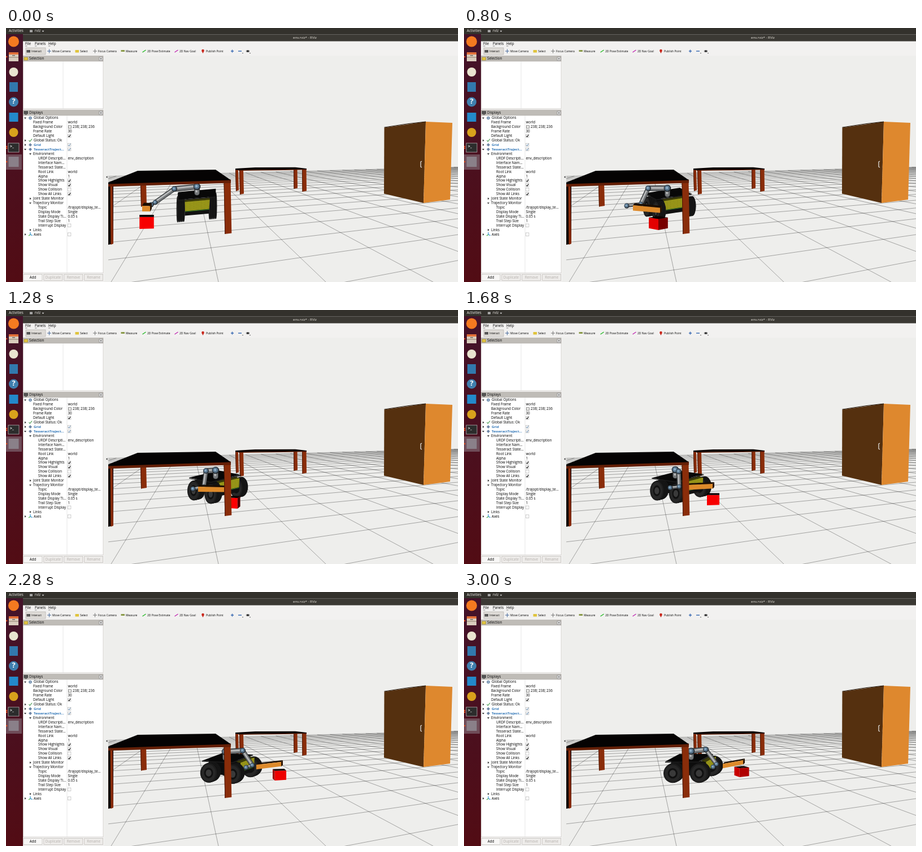
These frames come from a looping animation (800 by 450 pixels, 3.08 s). An HTML page with a canvas:

```html
<!DOCTYPE html>
<html lang="en">
<head>
<meta charset="utf-8">
<title>Robot trajectory</title>
<style>
html, body { margin: 0; width: 100%; height: 100%; overflow: hidden; background: #f2f1f0; }
canvas { display: block; }
</style>
</head>
<body>
<canvas id="stage" width="800" height="450"></canvas>
<script>
const g = document.getElementById('stage').getContext('2d');
const LOOP = 3080;

// ---------- drawing helpers ----------
function rect(x, y, w, h, fill, border) {
  if (fill) { g.fillStyle = fill; g.fillRect(x, y, w, h); }
  if (border) { g.strokeStyle = border; g.lineWidth = 0.6; g.strokeRect(x, y, w, h); }
}
function poly(points, fill) {
  g.beginPath();
  points.forEach(p => g.lineTo(p[0], p[1]));
  g.closePath();
  g.fillStyle = fill;
  g.fill();
}
function line(points, color, width = 1) {
  g.beginPath();
  points.forEach(p => g.lineTo(p[0], p[1]));
  g.strokeStyle = color;
  g.lineWidth = width;
  g.stroke();
}
function oval(x, y, rx, ry, fill) {
  g.beginPath();
  g.ellipse(x, y, rx, ry, 0, 0, 7);
  g.fillStyle = fill;
  g.fill();
}
const dot = (x, y, r, fill) => oval(x, y, r, r, fill);
function text(s, x, y, color = '#000', size = 6.25, style = '500', align = 'left') {
  g.font = `${style} ${size}px "Open Sans", "Noto Sans", sans-serif`;
  g.textAlign = align;
  g.textBaseline = 'middle';
  g.fillStyle = color;
  g.fillText(s, x, y + 0.3);
}

// ---------- window and panels ----------
function drawDock() {
  const shade = g.createLinearGradient(0, 0, 0, 450);
  shade.addColorStop(0, '#43142b');
  shade.addColorStop(1, '#520c14');
  rect(0, 11, 30, 439, shade);
  rect(0, 224, 28, 27, '#6f4c58');
  dot(13.5, 24, 9.5, '#f47a20');
  rect(5, 43, 17, 16, '#d9cdbd');
  rect(5, 43, 17, 4, '#e2713a');
  line([[5, 52], [22, 52]], '#8b7c6c');
  rect(11, 48, 5, 1.5, '#776a5c');
  dot(13.5, 78, 8, '#e9e4cf');
  rect(6, 96, 15, 17, '#3279ad');
  dot(13.5, 131, 8.5, '#3f7fae');
  text('?', 13.5, 130.5, '#fff', 13, 'bold', 'center');
  rect(5.5, 150, 16, 16, '#2389ca');
  dot(13.5, 185, 8, '#d8a21c');
  rect(4, 204, 19, 16, '#2c2c2c', '#ddd');
  text('>_', 7, 210, '#fff', 7, 'bold');
  rect(4.5, 228, 18, 18, '#8a8089');
  [51, 210, 213, 237].forEach(y => dot(1.2, y, 1.2, '#e95420'));
}

function drawToolbar() {
  rect(35, 35, 35, 12, '#dedbd7', '#a9a5a0');
  const tools = [
    [45, 'Interact', '#555'], [82, 'Move Camera', '#46699c'], [131, 'Select', '#e0c33a'],
    [163, 'Focus Camera', '#777'], [212, 'Measure', '#8a9a4a'], [250, '2D Pose Estimate', '#1fb81f'],
    [307, '2D Nav Goal', '#c022b0'], [354, 'Publish Point', '#c8261b']
  ];
  tools.forEach(([x, label, color], i) => {
    const c = x - 5.5;
    if (i === 5 || i === 6) line([[c - 3, 43], [c + 3, 39]], color, 1.4);
    else if (i === 7) { dot(c, 40, 2.3, color); poly([[c - 2, 41], [c + 2, 41], [c, 45]], color); }
    else if (i === 1 || i === 3) {
      line([[c - 3.5, 41], [c + 3.5, 41]], color);
      line([[c, 37.5], [c, 44.5]], color);
    } else rect(c - 3, 39, 6.5, i === 4 ? 3 : 4.5, color);
    text(label, x, 41, '#000', 5);
  });
  line([[398, 41], [403, 41]], '#4a76b8', 1.6);
  line([[400.5, 38.5], [400.5, 43.5]], '#4a76b8', 1.6);
  line([[411, 41], [417, 41]], '#4a76b8', 1.6);
  oval(428, 41, 3.2, 2, '#777');
  dot(428, 41, 1.2, '#111');
  [419, 432].forEach(x => poly([[x - 1, 44], [x + 1, 44], [x, 45.5]], '#333'));
}

function drawPanelHeader(y, label) {
  rect(30.5, y, 141.5, 9.5, '#bfbcb7', '#aaa6a1');
  if (label === 'Selection') rect(32, y + 2.5, 6.5, 5, '#e2c440', '#9a852a');
  else { rect(32, y + 2, 6.5, 4.5, '#555', '#222'); rect(33.5, y + 7.3, 3.5, 0.8, '#222'); }
  text(label, 41, y + 4.8);
  rect(165, y + 2, 6, 6, '#eee', '#777');
  line([[166.7, y + 3.7], [169.3, y + 6.3]], '#222', 0.8);
  line([[169.3, y + 3.7], [166.7, y + 6.3]], '#222', 0.8);
}

function arrow(x, y, open) {
  poly(open ? [[x - 2, y - 1], [x + 2, y - 1], [x, y + 1.7]]
            : [[x - 1, y - 2], [x - 1, y + 2], [x + 1.7, y]], '#333');
}
function checkbox(y, mark, x = 109.5) {
  rect(x, y - 2.8, 5.4, 5.4, '#fff', '#aaa');
  if (mark) line([[x + 1, y], [x + 2.3, y + 1.6], [x + 4.6, y - 1.9]], mark, 1.1);
}

// Rows: text column, label, value (true / false is a checkbox), arrow: 'v' open, '>' closed
const ROWS = [
  [49, 'Global Options', , 'v'], [48, 'Fixed Frame', 'world'],
  [48, 'Background Color', '238; 238; 236'], [48, 'Frame Rate', '30'], [48, 'Default Light', true],
  [49, 'Global Status: Ok', , '>'], [49, 'Grid', true, '>'], [49, 'TesseractTraject...', true, 'v'],
  [48, 'Environment', , 'v'], [57, 'URDF Descripti...', 'env_description'],
  [57, 'Interface Nam...'], [57, 'Tesseract State...'], [57, 'Root Link', 'world'], [57, 'Alpha', '1'],
  [57, 'Show Highlights', true], [57, 'Show Visual', true], [57, 'Show Collision', false],
  [57, 'Show All Links', true], [48, 'Joint State Monitor', , '>'], [48, 'Trajectory Monitor', , 'v'],
  [57, 'Topic', '/trajopt/display_te...'], [57, 'Display Mode', 'Single'],
  [57, 'State Display Ti...', '0.05 s'], [57, 'Trail Step Size', '1'], [57, 'Interrupt Display', false],
  [48, 'Links', , '>'], [49, 'Axes', false, '>']
];
function drawTree() {
  ROWS.forEach(([x, label, value, mark], i) => {
    const y = 159.5 + i * 7.93, blue = i === 6 || i === 7;
    if (mark) arrow(x === 49 ? 34 : 43, y, mark === 'v');
    text(label, x, y, blue ? '#2a72b5' : '#000', blue ? 6 : 6.25, blue ? 'bold' : '500');
    if (typeof value === 'boolean') checkbox(y, value && (blue ? '#7d9dbd' : '#111'));
    else if (i === 2) { rect(110.5, y - 2.5, 5, 5, '#eeeeec', '#444'); text(value, 118, y); }
    else if (value) text(value, 109.5, y);
    if (blue) poly([[40, y], [43, y - 3], [46, y], [43, y + 3]], '#6f86a5');
  });
  dot(43, 159.5, 2.8, '#6d8dac');
  dot(43, 159.5, 1, '#dde');
  line([[40.5, 199], [42.3, 201], [46, 196.5]], '#2f8f3a', 1.1);
  line([[43, 362], [43, 366], [47, 367.5]], '#2f8fd0', 1.2);
  line([[43, 366], [40, 368]], '#3fae3f', 1.2);
}

function drawWindow() {
  rect(0, 0, 800, 450, '#f2f1f0');
  rect(0, 0, 800, 11.5, '#33312c');
  rect(30, 11.5, 770, 12, '#3b3934');
  text('Activities', 5, 5.5, '#f0eeea');
  rect(42, 3.5, 5, 4, '#aaa');
  text('rviz', 51, 5.5, '#f0eeea');
  poly([[63.5, 4.7], [67.5, 4.7], [65.5, 7]], '#ddd');
  text('env.rviz* - RViz', 529, 17, '#eeeae2', 6.1, '500', 'center');
  drawDock();
  [['File', 34], ['Panels', 51], ['Help', 75]].forEach(([s, x]) => {
    text(s, x, 28.5);
    line([[x, 32], [x + 3.5, 32]], '#222', 0.5);
  });
  drawToolbar();
  drawPanelHeader(49.5, 'Selection');
  rect(30.5, 59, 141.5, 84, '#fff', '#bbb7b2');
  line([[101, 59], [101, 143]], '#ddd', 0.7);
  drawPanelHeader(145.5, 'Displays');
  rect(30.5, 155, 141.5, 279, '#fff', '#bbb7b2');
  line([[108, 155], [108, 434]], '#ddd', 0.7);
  drawTree();
  ['Add', 'Duplicate', 'Remove', 'Rename'].forEach((s, i) => {
    rect(31 + i * 35.9, 436.5, 33, 11, i ? '#eeecea' : '#f7f6f5', '#b8b4af');
    text(s, 47.5 + i * 35.9, 442, i ? '#b3afab' : '#000', 6.2, '500', 'center');
  });
  rect(174, 49, 7, 401, '#eeeeec');
  poly([[179.5, 262], [179.5, 266], [177, 264]], '#333');
}

// ---------- scene ----------
const HORIZON = 220, VP_NEAR = 326, VP_RIGHT = 1800;
const slope = depth => depth / (VP_RIGHT - 181);

function drawGrid() {
  const rows = 18, color = 'rgba(0,0,0,.5)';
  const depth = n => 1 / (0.00524 + 0.00101 * n);
  for (let n = -3; n <= rows; n++) {
    const d = depth(n);
    line([[181, HORIZON + d], [800, HORIZON + slope(d) * (VP_RIGHT - 800)]], color, 0.65);
  }
  const far = slope(depth(rows)), drop = 450 - HORIZON;
  for (let m = -9; m < 28; m++) {
    const dx = 186 + 190 * m - VP_NEAR;
    const s = far * (VP_RIGHT - VP_NEAR) / (drop + far * dx);
    line([[VP_NEAR + dx * s, HORIZON + drop * s], [VP_NEAR + dx, 450]], color, 0.65);
  }
}

function leg(x, top, w, bottom, tilt = 1) {
  poly([[x, top], [x + w, top], [x + w + tilt, bottom - 1.5], [x + tilt, bottom]], '#8a2d0a');
  line([[x + 0.5, top], [x + 0.5 + tilt, bottom]], '#4a1704', 1);
}

function drawBackground() {
  rect(181, 49, 619, 401, '#eeeeec');
  drawGrid();
  poly([[669.5, 176.5], [743, 166], [739, 310], [669, 293.5]], '#55300f');
  poly([[743, 166], [790, 168], [786, 304], [739, 310]], '#de882e');
  line([[669.5, 176], [711, 169.7], [743, 166]], '#1d0f04', 1);
  line([[736, 236], [734, 237], [734, 246], [736, 247]], '#eee', 1.2);
  leg(406, 250, 5, 289, 1);
  leg(509, 250, 6.5, 285, 0.5);
  leg(413, 251, 7, 295, 1);
  leg(524, 250, 7.5, 290, 0.5);
  poly([[406, 249], [441, 247], [512, 246.7], [532, 249], [532, 250.5], [412, 252], [406, 251]], '#080201');
  line([[412, 252.3], [532, 250.8]], '#5e1f07', 1.3);
  leg(238, 274, 10, 316.5, 1);
}

function drawNearTable() {
  poly([[181, 274], [190, 274], [190, 382], [181, 384]], '#0d0301');
  poly([[184.5, 274], [188.5, 274], [190, 382], [185.5, 384]], '#8a2d0a');
  leg(385.5, 271, 12, 365, 1.8);
  poly([[181, 275], [398, 268.5], [398, 274.5], [181, 281]], '#641f06');
  poly([[181, 273.5], [233, 253], [371, 251], [398, 269.5], [181, 276.5]], '#050303');
}

// ---------- motion ----------
// Poses hold for 80, 40 and 80 ms in turn.
function poseAt(ms) {
  const r = ms % 200;
  return Math.floor(ms / 200) * 3 + (r >= 120 ? 2 : r >= 80 ? 1 : 0);
}

const STEPS = [0, 5, 12, 19, 25, 34, 45];
const ROBOT = { // ground centre and heading in degrees
  x: [338, 348, 364, 375, 384, 399, 406], y: [318, 317, 316, 316.5, 316, 314.5, 314],
  turn: [90, 80, 72, 55, 50, 35, 24]
};
const CUBE = { // near bottom corner height and turn in degrees
  x: [249, 287, 344, 401, 441, 484, 491.5], y: [356, 359, 358, 352, 346, 334, 328],
  turn: [0, 14, 45, 78, 90, 100, 119]
};
const ARM = { // shoulder, elbow, wrist, tool
  sx: [338, 349, 360, 371, 374, 388, 402], sy: [281, 281, 284, 284, 283, 283, 282],
  ex: [298, 311, 326, 354, 380, 419, 428], ey: [285, 283, 284, 285, 286, 281, 279],
  wx: [264, 282, 313, 350, 381, 436, 447], wy: [309, 306, 312, 313, 313, 307, 305],
  tx: [257, 263, 288, 331, 365, 425, 441], ty: [313, 311, 315, 317, 315, 311, 310]
};
const BAR = { // upper edge of the front
  x1: [241, 261, 299, 340, 396, 443, 458], y1: [315, 314.5, 314, 313, 310, 306, 304.5],
  x2: [255, 292, 347, 386, 440, 487, 494], y2: [315.5, 319.5, 318.5, 314, 308, 301, 298]
};

// Monotone cubic through the key values
function ease(values, k) {
  const last = STEPS.length - 1;
  const rate = i => (values[i + 1] - values[i]) / (STEPS[i + 1] - STEPS[i]);
  const tangent = i => {
    if (i === 0) return rate(0);
    if (i === last) return 0;
    const a = rate(i - 1), b = rate(i);
    return a * b > 0 ? 2 * a * b / (a + b) : 0;
  };
  let i = 0;
  while (i < last - 1 && k >= STEPS[i + 1]) i++;
  const span = STEPS[i + 1] - STEPS[i], t = (k - STEPS[i]) / span, u = 1 - t;
  return values[i] * u * u * (1 + 2 * t) + values[i + 1] * t * t * (3 - 2 * t)
    + span * t * u * (tangent(i) * u - tangent(i + 1) * t);
}
const pose = (track, k) =>
  Object.fromEntries(Object.entries(track).map(([name, v]) => [name, ease(v, k)]));

// ---------- moving parts ----------
function drawRobot(k) {
  const { x, y, turn } = pose(ROBOT, k);
  const unit = 18 - k / 45, a = turn * Math.PI / 180, c = Math.cos(a), s = Math.sin(a);
  const at = (f, side, z) => {
    const dx = unit * (f * c - side * s);
    return [x + dx, y - unit * z + 0.2 * unit * (f * s + side * c) - 0.09 * dx];
  };
  const wheel = (f, side) => {
    const rx = unit * (0.95 * c + 0.05);
    for (let i = -4; i <= 4; i++) {
      const [px, py] = at(f, side + i * 0.08, 0);
      oval(px, py, rx + 0.8, unit, i % 2 ? '#0e0e0e' : '#1d1d1d');
    }
    const [px, py] = at(f, side + 0.34, 0);
    oval(px, py, rx * 0.86, unit * 0.86, '#272727');
    oval(px, py, rx * 0.55, unit * 0.55, '#101010');
    oval(px, py, rx * 0.36, unit * 0.36, '#3a3a3a');
  };
  wheel(-1.5, -1.55);
  wheel(1.5, -1.55);
  poly([at(-2, 1.2, 1.1), at(2, 1.2, 1.1), at(2, 1.2, -0.3), at(-2, 1.2, -0.3)], '#0d0d0d');
  poly([at(2, 1.2, 1.1), at(2, -1.2, 1.1), at(2, -1.2, -0.3), at(2, 1.2, -0.3)], '#111');
  poly([at(1.4, 1.25, 1.15), at(1.4, -1.25, 1.15), at(2, -1.25, 1), at(2, 1.25, 1)], '#3c3c0a');
  poly([at(2, 1.25, 1.05), at(2, -1.25, 1.05), at(2, -1.2, 0.15), at(2, 1.2, 0.15)], '#aaa71c');
  g.setLineDash([1.2, 1.4]);
  for (let z = 0.25; z < 1.05; z += 0.13) line([at(2, 1.2, z), at(2, -1.2, z)], '#3b3a08', 0.9);
  g.setLineDash([]);
  line([at(2, 1.2, 0.1), at(2, -1.2, 0.1)], '#3f9a2c', 0.8);
  wheel(-1.5, 1.6);
  wheel(1.5, 1.6);
  poly([at(-2.4, -1.85, 1.2), at(1.4, -1.85, 1.2), at(1.4, 1.85, 1.2), at(-2.4, 1.85, 1.2)], '#080808');
  line([at(1.4, -1.85, 1.15), at(1.4, 1.85, 1.15), at(-2.4, 1.85, 1.15)], '#1b1b1b', 1.5);
}

function drawCube(k) {
  const { x, y, turn } = pose(CUBE, k);
  const size = 25.5 - 0.14 * k, a = turn % 90 * Math.PI / 180;
  const p = size * Math.sin(a), q = size * Math.cos(a), h = size * 0.83;
  const mx = x + (p - q) / 2, top = y - h;
  const left = [mx - p, top - q * 0.15], right = [mx + q, top - p * 0.15];
  const down = ([px, py]) => [px, py + h * 0.96];
  const red = v => `rgb(${Math.round(255 * v)},0,0)`;
  const near = [mx, top], foot = [mx, y];
  poly([left, near, foot, down(left)], red(0.3 + 0.7 * Math.sqrt(p / size)));
  poly([near, right, down(right), foot], red(0.3 + 0.67 * (q / size) ** 4));
  poly([left, near, right, [mx + q - p, top - (p + q) * 0.15]], '#0c0000');
}

function tube(a, b, w) {
  g.lineCap = 'round';
  line([a, b], '#26292b', w);
  line([a, b], '#747779', w - 1.8);
  g.lineCap = 'butt';
  line([[a[0] - 0.8, a[1] - 0.8], [b[0] - 0.8, b[1] - 0.8]], '#b9bbbc', w * 0.3);
}
function joint([x, y], r) {
  dot(x, y, r, '#23292e');
  dot(x - 0.4, y - 0.4, r * 0.78, '#56728a');
  dot(x - 0.8, y - 0.8, r * 0.35, '#8fb0c8');
}
function drawArm(k) {
  const { sx, sy, ex, ey, wx, wy, tx, ty } = pose(ARM, k);
  const shoulder = [sx, sy], elbow = [ex, ey], wrist = [wx, wy], tool = [tx, ty];
  tube([sx, sy + 11], shoulder, 10);
  tube(shoulder, elbow, 9.5);
  joint(shoulder, 6.3);
  tube(elbow, wrist, 8);
  joint(elbow, 5);
  tube(wrist, tool, 6);
  joint(wrist, 4.3);
  joint(tool, 4.5);
}

function drawBar(k) {
  const { x1, y1, x2, y2 } = pose(BAR, k);
  const rise = 5.5 - Math.min(k, 15) * 0.17, h = 10 - k * 0.05;
  poly([[x1, y1], [x1 + 3, y1 - rise], [x2 + 3, y2 - rise], [x2, y2]], '#1c0e02');
  poly([[x2, y2], [x2 + 3, y2 - rise], [x2 + 3, y2 - rise + h], [x2, y2 + h]], '#2c1604');
  poly([[x1, y1], [x2, y2], [x2, y2 + h - 0.5], [x1, y1 + h]], '#dd8a2b');
}

function drawScene(k) {
  g.save();
  g.beginPath();
  g.rect(181, 49, 619, 401);
  g.clip();
  drawBackground();
  drawRobot(k);
  drawCube(k);
  drawArm(k);
  drawBar(k);
  drawNearTable();
  g.restore();
}

function frame() {
  drawWindow();
  drawScene(poseAt(performance.now() % LOOP));
  requestAnimationFrame(frame);
}
frame();
</script>
</body>
</html>
```
